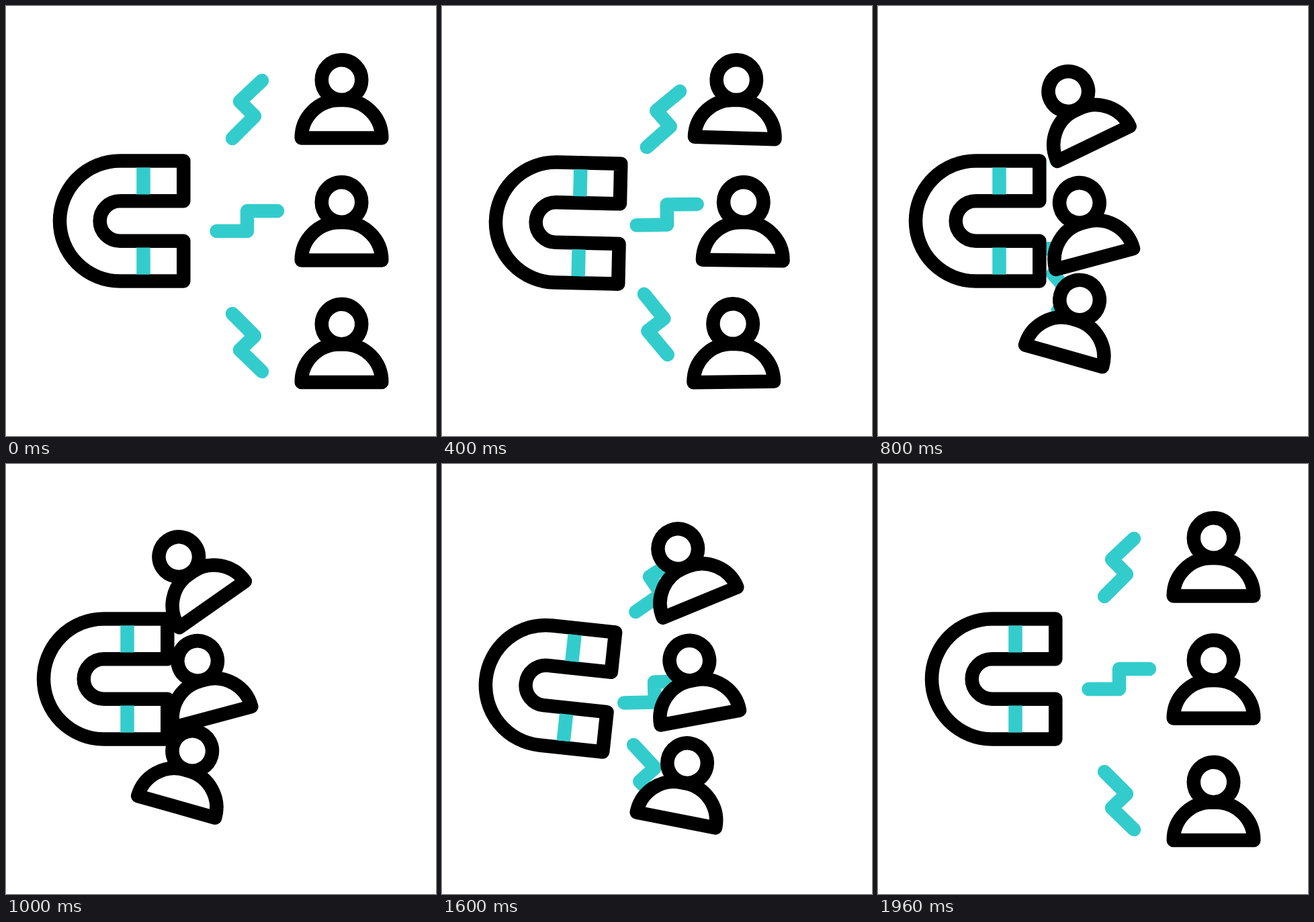
An HTML page that plays this animation: 640x640 px, repeating every 2 s.

```html
<!DOCTYPE html>
<html lang="en">
<head>
<meta charset="utf-8">
<title>Magnet attracting people</title>
<style>
  html, body { margin: 0; height: 100%; overflow: hidden; background: #fff; }
  svg { display: block; width: 100vw; height: 100vh; }
  g {
    fill: #fff; stroke: #000; stroke-width: 20.5; stroke-linecap: round; stroke-linejoin: round;
    transform-box: fill-box; transform-origin: center;
  }
  #magnet { transform-origin: left center; }
  .bolt { fill: none; stroke: #3cc; }
  .stripe { stroke: #3cc; stroke-linecap: butt; }
</style>
</head>
<body>
<svg viewBox="0 0 640 640">
  <defs>
    <g id="person">
      <path d="M-59.8 58A56.5 56.5 0 0 1 -3.3 1.5H3.3A56.5 56.5 0 0 1 59.8 58Z"/>
      <circle cy="-28.5" r="29.75"/>
    </g>
  </defs>
  <g id="bolt1" class="bolt"><path d="M337 197l33-33-22-22 33-31"/></g>
  <g id="bolt2" class="bolt"><path d="M313.5 335H359V305H404"/></g>
  <g id="bolt3" class="bolt"><path d="M337 458l33 33-22 21 33 32"/></g>
  <g id="magnet">
    <path d="M264.3 230.5H169.5a89.5 89.5 0 0 0 0 179h94.8v-59.7h-94.8a29.8 29.8 0 0 1 0-59.6h94.8z"/>
    <path class="stripe" d="M204.5 240.5v40M204.5 359.5v40"/>
  </g>
  <g id="person1"><use href="#person" x="499.5" y="138.5"/></g>
  <g id="person2"><use href="#person" x="499.5" y="320.5"/></g>
  <g id="person3"><use href="#person" x="499.5" y="502"/></g>
</svg>
<script>
const LOOP = 2000;

// Offsets [dx, dy, degrees] from rest: on the way to the magnet, and stuck to it.
const bolts = [
  { via: [-29.5, 14.5, 3.5], end: [-68, 45.3, 17] },
  { via: [-24, -9.5, -0.8], end: [-70, 32, -2] },
  { via: [-40.5, -27, 6], end: [-87.7, -64.4, 3.3] },
];
const people = [
  { via: [-169, 0.5, -11], end: [-226, 23, -35], pace: 1.8 },
  { via: [-169, 0, -15], end: [-207, 0, -15], pace: 2.15 },
  { via: [-171, -20.5, 15.7], end: [-230, -47.5, 15.8], pace: 1.71 },
];

const ramp = (t, from, to) => Math.min(1, Math.max(0, (t - from) / (to - from)));
const smooth = u => u * u * (3 - 2 * u);
const easeOut = u => 1 - (1 - u) ** 1.6;
const release = t => smooth(ramp(t, 1400, 1960) ** 0.83);
const kick = (t, from) => Math.sin(Math.PI * ramp(t, from, from + 400)) ** 2;

function place(id, [x, y, angle]) {
  document.getElementById(id).style.transform =
    `translate(${x}px, ${y}px) rotate(${angle}deg)`;
}

function boltPose({ via, end }, t) {
  const run = ramp(t, 80, 400) ** 1.5, settle = easeOut(ramp(t, 400, 1000));
  const hold = 1 - release(t);
  return via.map((v, i) => (v * run + (end[i] - v) * settle) * hold);
}

// People slide first, lean slightly the other way, then tip over and rise.
function personPose({ via, end, pace }, t) {
  const run = ramp(t, 80, 640) ** pace, settle = easeOut(ramp(t, 640, 1000));
  const tip = smooth(ramp(t, 400, 600));
  const hold = 1 - release(t), tipHold = 1 - release(t) ** 1.3;
  const leanBack = -0.05 * end[2] * Math.sin(Math.PI * ramp(t, 80, 640));
  const arrive = [run * hold, run ** 4 * hold, tip * tipHold];
  const pose = via.map((v, i) => v * arrive[i] + (end[i] - v) * settle * hold);
  pose[2] += leanBack;
  return pose;
}

function magnetPose(t) {
  const shift = smooth(ramp(t, 400, 600)) * (1 - release(t));
  return [-24 * shift, 0, 6.1 * (kick(t, 340) + kick(t, 1410))];
}

const start = performance.now();
function draw() {
  const t = (performance.now() - start) % LOOP;
  bolts.forEach((bolt, i) => place(`bolt${i + 1}`, boltPose(bolt, t)));
  people.forEach((person, i) => place(`person${i + 1}`, personPose(person, t)));
  place('magnet', magnetPose(t));
  requestAnimationFrame(draw);
}
draw();
</script>
</body>
</html>
```
